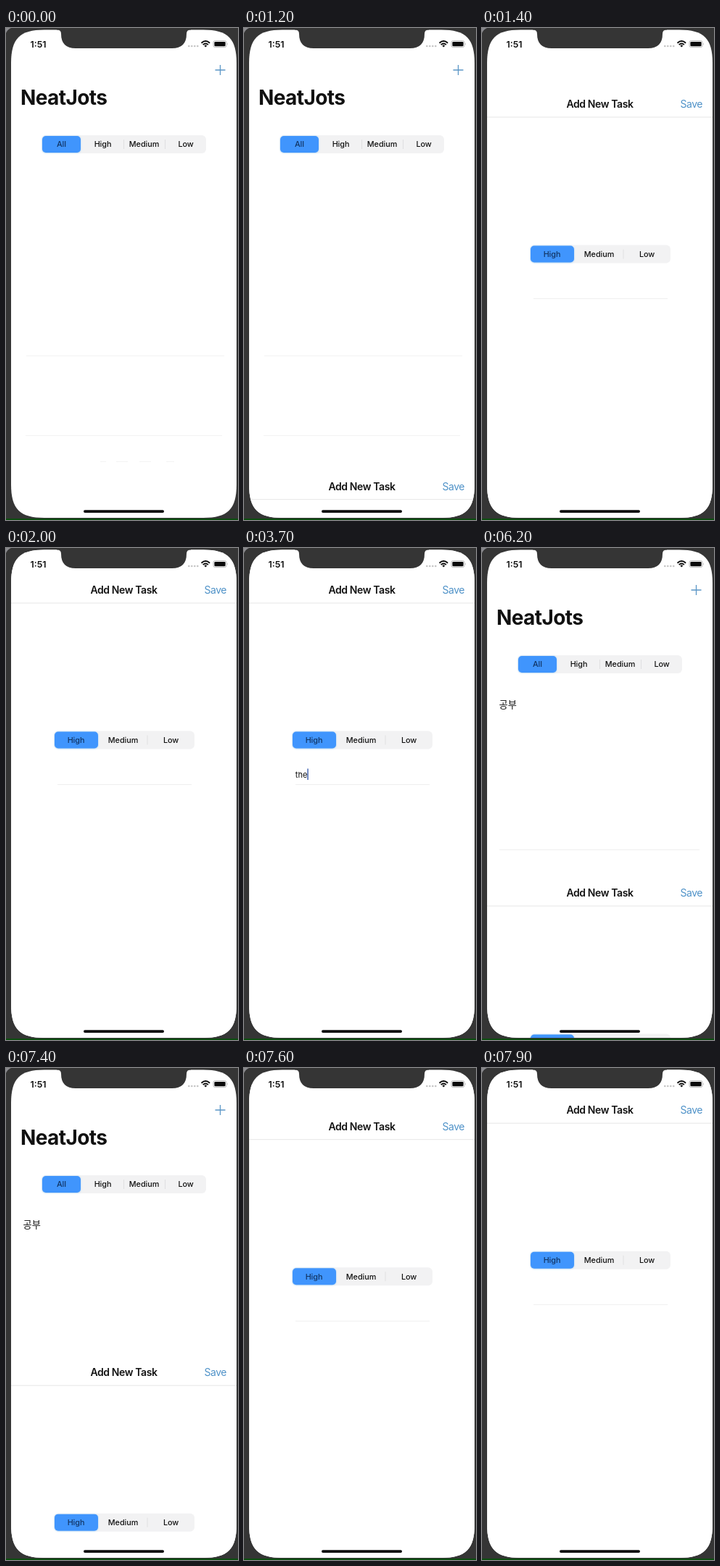
Recreate the animation shown at these times as an HTML page. Size 320 by 679 pixels, loop 8 s.

```html
<!DOCTYPE html>
<html lang="en">
<head>
<meta charset="utf-8">
<title>Task list</title>
<style>
  html, body { margin: 0; width: 100%; height: 100%; overflow: hidden; background: #353535; }
  svg { display: block; width: 100%; height: 100%; }
  text { font-family: Inter, "Noto Sans CJK KR", "Noto Sans CJK", sans-serif; fill: #111; }
  .label { font-size: 10.8px; font-weight: 450; text-anchor: middle; letter-spacing: -.05px; }
  .on { fill: #123463; font-weight: 550; }
  .title { font-size: 14px; font-weight: 600; text-anchor: middle; letter-spacing: -.4px; }
  .save { font-size: 14px; text-anchor: end; letter-spacing: -.45px; fill: #4f92c8; }
  .large { font-size: 28px; font-weight: 700; letter-spacing: -.6px; }
  .clock { font-size: 12.4px; font-weight: 600; }
  .rule { stroke: #efefef; stroke-width: 1; }
  .pale { stroke: #f3f3f3; }
</style>
</head>
<body>
<svg viewBox="0 0 320 679" preserveAspectRatio="none">
  <defs>
    <clipPath id="screen"><path id="outline"/></clipPath>
    <filter id="soft" x="-20%" y="-30%" width="140%" height="160%">
      <feDropShadow dx="0" dy="0.3" stdDeviation="1" flood-color="#6fbcf5" flood-opacity=".6"/>
    </filter>
  </defs>
  <rect width="320" height="679" fill="#353535"/>
  <path d="M0 0H7Q2 2 0 7Z" fill="#8b8b90"/>
  <rect y="677" width="320" height="2" fill="#0c4d10"/>

  <g clip-path="url(#screen)">
    <rect x="7" width="311" height="679" fill="#fff"/>
    <g id="list">
      <path d="M288.5 58H302.5M295.5 51V65" stroke="#5b96c6" stroke-width="1.3"/>
      <text class="large" x="20" y="105.5">NeatJots</text>
      <g id="filter"></g>
      <path id="idleRules" class="rule pale" d="M28 452.5H301M27 562.5H298M130 598.5h8M152 598.5h16M184 598.5h16M221 598.5h11"/>
      <g id="row">
        <text x="23.5" y="220.5" font-size="13.2" font-weight="350">공부</text>
        <path class="rule" d="M24 416.5H300"/>
      </g>
    </g>
    <g id="sheet">
      <rect x="7" width="311" height="679" fill="#fff"/>
      <text class="title" x="162.5" y="63">Add New Task</text>
      <text class="save" x="304" y="63">Save</text>
      <path d="M7 76H318" stroke="#e6e6e6"/>
      <g id="priority"></g>
      <path class="rule" d="M71 326.5H256"/>
      <text id="field" x="70.8" y="316.5" font-size="11"></text>
      <rect id="caret" y="304.5" width="1.5" height="15.5" fill="#4968b4"/>
    </g>
  </g>

  <path d="M70 0V2.6Q76 2.6 76 8Q76 28 96 28H229Q249 28 249 8Q249 2.6 255 2.6V0Z" fill="#353535"/>
  <text class="clock" x="33.5" y="26.5">1:51</text>
  <g fill="#c4c4c4">
    <circle cx="252.3" cy="25" r="1.3"/><circle cx="256.3" cy="25" r="1.3"/>
    <circle cx="260.3" cy="25" r="1.3"/><circle cx="264.3" cy="25" r="1.3"/>
  </g>
  <g fill="none" stroke="#0a0a0a" stroke-width="1.9">
    <path d="M269.5 20.7Q275.3 15.5 281.1 20.7M271.7 23.1Q275.3 19.9 278.9 23.1"/>
    <path d="M273.4 24.4Q275.3 22.8 277.2 24.4L275.3 26.4Z" fill="#0a0a0a" stroke="none"/>
  </g>
  <rect x="286" y="17.5" width="18" height="9.2" rx="2.6" fill="none" stroke="#b5b5b5" stroke-width=".9"/>
  <rect x="287.4" y="18.9" width="15.2" height="6.4" rx="1.4" fill="#0a0a0a"/>
  <path d="M305.2 20.5q1.6 1.6 0 3.2Z" fill="#b5b5b5"/>
  <rect x="107" y="665.2" width="111" height="3.7" rx="1.85" fill="#0a0a0a"/>
</svg>

<script>
const LOOP = 8000, STEP = 100, TRAVEL = 679, STIFF = 0.01826;
const $ = id => document.getElementById(id);

// Rectangle with smooth corners: e is their extent, k the handle inset
function smoothRect(l, t, r, b, e, k) {
  return `M${l} ${t + e}C${l} ${t + k} ${l + k} ${t} ${l + e} ${t}
    H${r - e}C${r - k} ${t} ${r} ${t + k} ${r} ${t + e}
    V${b - e}C${r} ${b - k} ${r - k} ${b} ${r - e} ${b}
    H${l + e}C${l + k} ${b} ${l} ${b - k} ${l} ${b - e}Z`;
}
$("outline").setAttribute("d", smoothRect(7, 2.6, 318, 676, 46, 12));

// Segmented control with its first segment selected
function segments(id, x, y, width, selected, labels, centers, dividers) {
  const lines = dividers.map(d => `M${d} ${y + 6}V${y + 19}`).join("");
  const words = labels.map((s, i) =>
    `<text class="label${i ? "" : " on"}" x="${centers[i]}" y="${y + 16.3}">${s}</text>`).join("");
  $(id).innerHTML =
    `<rect x="${x}" y="${y}" width="${width}" height="25" rx="6" fill="#f2f2f3"/>
     <path d="${lines}" stroke="#dfdfe1"/>
     <rect x="${x + 1}" y="${y + 1}" width="${selected}" height="23" rx="5" fill="#4095fd" filter="url(#soft)"/>
     ${words}`;
}
segments("filter", 49, 148, 227, 53, ["All", "High", "Medium", "Low"],
  [76.5, 133.5, 190.5, 248], [162.5, 219.5]);
segments("priority", 66, 252.5, 194, 60, ["High", "Medium", "Low"],
  [96.5, 161.5, 227.5], [195]);

// Critically damped spring from 0 to 1
function spring(ms) {
  const x = Math.max(0, ms) * STIFF;
  return 1 - (1 + x) * Math.exp(-x);
}

// [time, field text, caret x]
const typing = [
  [0, "", 70], [3200, "r", 75], [3300, "rh", 81], [3400, "rhd", 88],
  [3700, "the", 87.3], [3900, "th", 81], [4000, "t", 75], [4100, "", 70],
  [4400, "ㄱ", 80.5], [4500, "고", 80.5], [4700, "공", 80.5],
  [4800, "공부", 90.3], [6600, "", 70]
];

function caretOpacity(t) {
  if (t < 2500 || t >= 6000) return 0;
  if (t < 2600) return 0.5;
  if (t >= 5300 && t < 5400 || t >= 5700 && t < 5800) return 0.5;
  return t >= 5400 && t < 5700 ? 0 : 1;
}

function sheetOffset(t) {
  if (t < 6086) return TRAVEL * (1 - spring(t - 1162));
  if (t < 7312) return TRAVEL * spring(t - 6086);
  return TRAVEL * (1 - spring(t - 7313.8));
}

function draw(t) {
  $("sheet").setAttribute("transform", `translate(0 ${sheetOffset(t).toFixed(2)})`);
  $("idleRules").setAttribute("opacity", t < 3000 ? 1 : 0);
  $("row").setAttribute("opacity", t < 3000 ? 0 : 1);
  const [, text, x] = typing.filter(k => k[0] <= t).pop();
  $("field").textContent = text;
  $("caret").setAttribute("x", x);
  $("caret").setAttribute("opacity", caretOpacity(t));
}

const start = performance.now();
function tick() {
  const t = (performance.now() - start) % LOOP;
  draw(Math.floor(t / STEP) * STEP);
  requestAnimationFrame(tick);
}
tick();
</script>
</body>
</html>
```
